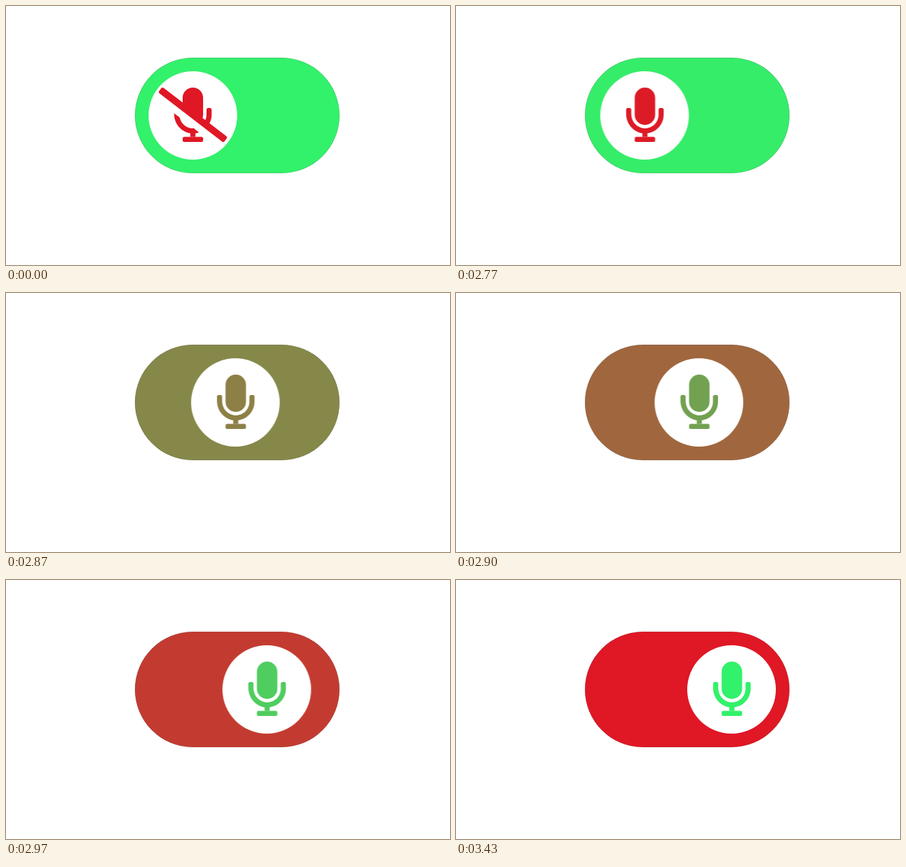
Animation, 651 px wide and 381 px high, one loop 6.36 s. Source, as an HTML page:

```html
<!DOCTYPE html>
<html lang="en">
<head>
<meta charset="utf-8">
<title>Microphone switch</title>
<style>
  :root { --on: #32f16a; --off: #e01725; --t: 0; }
  html, body { margin: 0; width: 100%; height: 100%; overflow: hidden; background: #fff; }

  .pill, .knob, .mic, .muted {
    position: absolute;
    animation: 6360ms infinite paused;
    animation-delay: calc(var(--t) * -1ms);
  }
  .pill {
    left: 189px; top: 76px; width: 300px; height: 170px;
    border-radius: 85px;
    box-shadow: inset 0 0 0 .5px rgba(90, 90, 90, .4);
    animation-name: to-off;
  }
  .knob {
    left: 20px; top: 20px; width: 130px; height: 130px;
    border-radius: 50%; background: #fff;
    animation-name: slide;
  }
  svg { top: 24px; height: 80px; fill: currentColor; }
  .mic { left: 37.5px; width: 55px; animation-name: to-on, show; }
  .muted { left: 15px; width: 100px; color: var(--off); animation-name: hide; }

  /* Icon swaps at 2730 ms; the slide runs from 2750 to 3150 ms. */
  @keyframes slide {
    0%, 43.239% { transform: none; animation-timing-function: ease; }
    49.528%, 100% { transform: translateX(130px); }
  }
  @keyframes to-off {
    0%, 43.239% { background-color: var(--on); animation-timing-function: ease; }
    49.528%, 100% { background-color: var(--off); }
  }
  @keyframes to-on {
    0%, 43.239% { color: var(--off); animation-timing-function: ease; }
    49.528%, 100% { color: var(--on); }
  }
  @keyframes show {
    0% { opacity: 0; animation-timing-function: step-end; }
    42.924%, 100% { opacity: 1; }
  }
  @keyframes hide {
    0% { opacity: 1; animation-timing-function: step-end; }
    42.924%, 100% { opacity: 0; }
  }
</style>
</head>
<body>
<div class="pill">
  <div class="knob">
    <svg class="mic" viewBox="0 0 352 512">
      <rect x="80" width="192" height="352" rx="96"/>
      <path d="M336 192h-16c-8.84 0-16 7.16-16 16v48c0 74.8-64.49 134.82-140.79 127.38C96.71 376.89 48 317.11 48 250.3V208c0-8.84-7.16-16-16-16H16c-8.84 0-16 7.16-16 16v40.16c0 89.64 63.97 169.55 152 181.69V464H200v-33.77C285.71 418.47 352 344.9 352 256v-48c0-8.84-7.16-16-16-16z"/>
      <rect x="80" y="464" width="192" height="48" rx="16"/>
    </svg>
    <svg class="muted" viewBox="0 0 640 512">
      <path d="M633.82 458.1l-157.8-121.96C488.61 312.13 496 285.01 496 256v-48c0-8.84-7.16-16-16-16h-16c-8.84 0-16 7.16-16 16v48c0 17.92-3.96 34.8-10.72 50.2l-26.55-20.52c3.1-9.4 5.28-19.22 5.28-29.67V96c0-53.02-42.98-96-96-96s-96 42.98-96 96v45.36L45.47 3.37C38.49-2.05 28.43-.8 23.01 6.18L3.37 31.45C-2.05 38.42-.8 48.47 6.18 53.9l588.36 454.73c6.98 5.43 17.03 4.17 22.46-2.81l19.64-25.27c5.41-6.97 4.16-17.02-2.82-22.45z"/>
      <path d="M344 464v-33.77c11.66-1.6 22.85-4.54 33.67-8.31l-50.11-38.73c-6.71.4-13.41.87-20.35.2-55.85-5.45-98.74-48.63-111.18-101.85L144 241.31v6.85c0 89.64 63.97 169.55 152 181.69V464z"/>
      <rect x="224" y="464" width="192" height="48" rx="16"/>
    </svg>
  </div>
</div>
<script>
  const LOOP = 6360, START = 2730, STOP = 3130, SETTLE = 3430;

  // The slide advances at 30 steps per second, then holds until it settles.
  function snap(t) {
    if (t < START || t >= SETTLE) return t;
    const ticks = Math.floor((Math.min(t, STOP) - START) / 10);
    return START + Math.floor(ticks * 0.3 + 1e-6) / 0.03;
  }

  function tick() {
    document.documentElement.style.setProperty('--t', snap(performance.now() % LOOP));
    requestAnimationFrame(tick);
  }
  tick();
</script>
</body>
</html>
```
